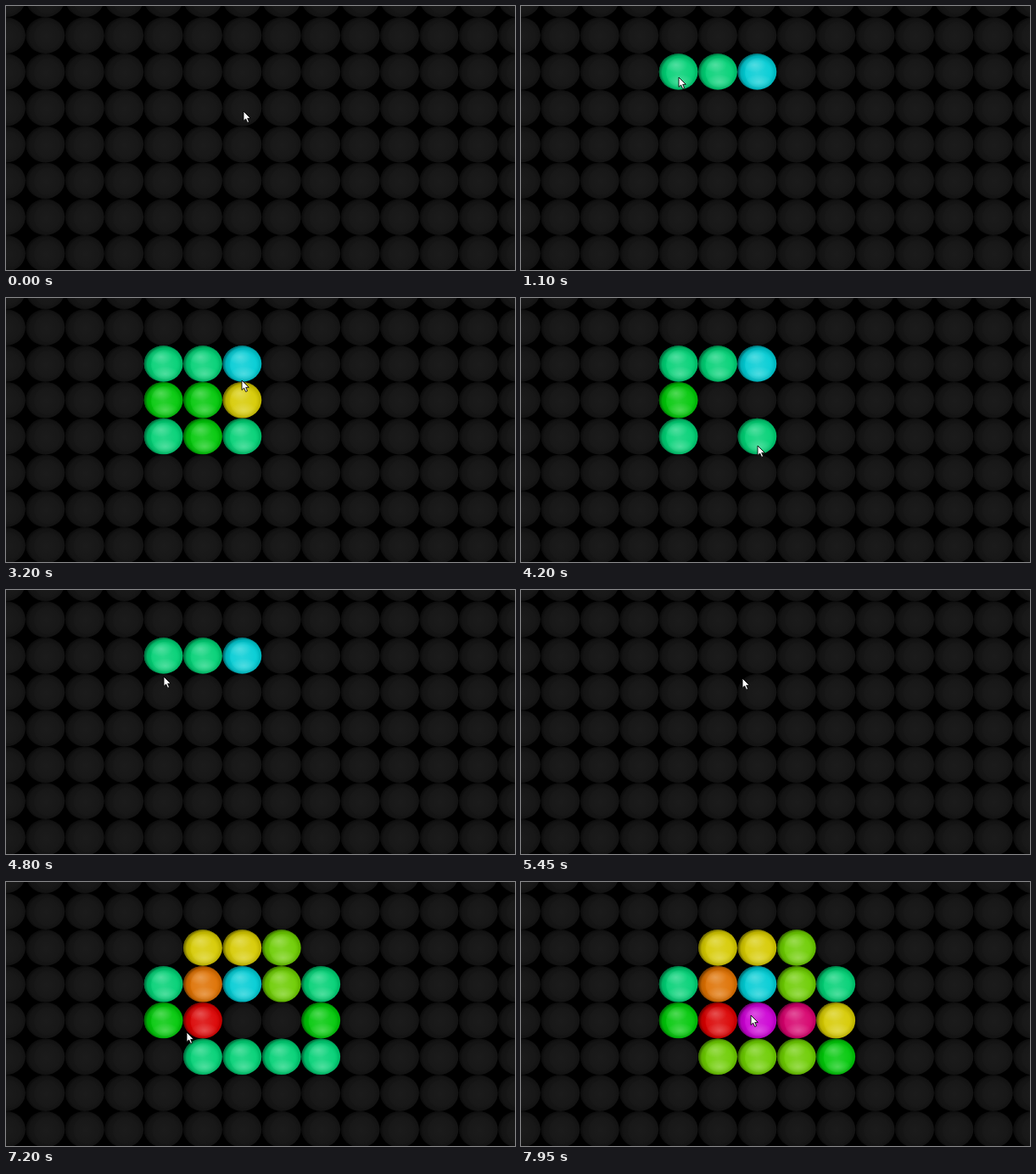
These frames come from a looping animation (600 px wide and 311 px high, 8 s). An HTML page:

```html
<!DOCTYPE html>
<html lang="en">
<head>
<meta charset="utf-8">
<title>Colour balls</title>
<style>
  html, body { margin: 0; width: 100%; height: 100%; overflow: hidden; background: #000; }
  svg { display: block; width: 100vw; height: 100vh; }
</style>
</head>
<body>
<svg viewBox="0 0 600 311" preserveAspectRatio="none">
  <defs>
    <radialGradient id="rim" cx=".54" cy=".52" r=".52">
      <stop offset=".6" stop-color="#000" stop-opacity="0"/>
      <stop offset=".88" stop-color="#000" stop-opacity=".13"/>
      <stop offset="1" stop-color="#000" stop-opacity=".45"/>
    </radialGradient>
    <radialGradient id="lens" cx=".42" cy=".5" r=".6">
      <stop offset="0" stop-color="#fff" stop-opacity=".16"/>
      <stop offset="1" stop-color="#fff" stop-opacity=".02"/>
    </radialGradient>
    <radialGradient id="glow">
      <stop offset="0" stop-color="#fff" stop-opacity=".24"/>
      <stop offset="1" stop-color="#fff" stop-opacity="0"/>
    </radialGradient>
    <g id="ball">
      <ellipse rx="22.9" ry="21.3" fill="currentColor"/>
      <ellipse rx="22.9" ry="21.3" fill="url(#rim)"/>
    </g>
    <g id="off" color="#161616">
      <use href="#ball"/>
      <ellipse cx="3.5" cy="1" rx="16.5" ry="17" fill="url(#lens)" opacity=".14"/>
    </g>
    <g id="lit">
      <use href="#ball"/>
      <ellipse cx="2.5" cy="1" rx="17" ry="17.5" fill="url(#lens)"/>
      <ellipse cx="-3" cy="-8" rx="14" ry="9" fill="url(#glow)"/>
      <ellipse cx="2" cy="12" rx="16" ry="9" fill="url(#glow)"/>
    </g>
  </defs>
  <rect width="600" height="311"/>
  <g id="grid"></g>
  <path id="cursor" d="M0 0V11.4L2.6 9L4.6 13.4L6.6 12.5L4.7 8.3H8.3Z"
        fill="#fff" stroke="#000" stroke-width=".9"/>
</svg>
<script>
const LOOP = 8000, TICK = 50, COLS = 14, ROWS = 8;
const COLORS = {
  c: '#00ccd4', t: '#00d074', g: '#00c808', l: '#6ccc00', y: '#d6ca00',
  o: '#de7000', r: '#da0000', p: '#d6006c', m: '#cc00d4'
};
const STEPS = { L: [-1, 0], R: [1, 0], U: [0, -1], D: [0, 1] };
const centerX = col => col * 46.4;
const centerY = row => row * 42.8 - 8.2;

const path = [];
const changes = [];

function move(time, x, y) {
  path.push({ time, x, y });
}

// Walk from ball to ball; each visit sets the next colour, or clears without one.
function stroke(time, interval, col, row, steps, colors = '') {
  for (let i = 0; i <= steps.length; i++) {
    if (i) {
      const [dx, dy] = STEPS[steps[i - 1]];
      col += dx;
      row += dy;
      time += interval;
    }
    move(time, centerX(col), centerY(row));
    changes.push({ time, ball: row * COLS + col, color: COLORS[colors[i]] });
  }
}

move(0, 280, 124);
stroke(725, 175, 6, 2, 'LLDDRRU', 'cttgtgty');
move(2000, 267, 133);
stroke(2250, 0, 5, 3, '', 'g');
move(2550, 246, 138);
move(2850, 280, 111);
move(3000, 280, 110);
move(3250, 277, 94);
stroke(3400, 350, 6, 3, 'LD');
move(4200, 279, 174);
stroke(4250, 0, 6, 4, '');
stroke(4550, 175, 4, 4, 'UURR');
move(5450, 261, 104);
move(5600, 299, 132);
stroke(5900, 120, 6, 3, 'LLD', 'cttg');
move(6350, 240, 217);
stroke(6420, 66, 5, 5, 'RRRUULULLDD', 'ttttgtllyyor');
move(7200, 213, 177);
stroke(7300, 93, 5, 5, 'RRRULL', 'lllgypm');
move(7950, 271, 157);
move(LOOP, 271, 157);

const grid = document.getElementById('grid');
const cursor = document.getElementById('cursor');
const balls = Array.from({ length: COLS * ROWS }, (_, i) => {
  const ball = document.createElementNS('http://www.w3.org/2000/svg', 'use');
  const x = centerX(i % COLS), y = centerY(Math.floor(i / COLS));
  ball.setAttribute('transform', `translate(${x} ${y})`);
  return grid.appendChild(ball);
});

function pointerAt(t) {
  const next = path.findIndex(p => p.time > t);
  const a = path[next - 1], b = path[next];
  const k = (t - a.time) / (b.time - a.time);
  return [a.x + (b.x - a.x) * k, a.y + (b.y - a.y) * k];
}

function render(t) {
  const state = {};
  for (const { time, ball, color } of changes) {
    if (time <= t) state[ball] = color;
  }
  balls.forEach((ball, i) => {
    ball.setAttribute('href', state[i] ? '#lit' : '#off');
    ball.setAttribute('color', state[i] || '#000');
  });
  const [x, y] = pointerAt(t).map(Math.round);
  cursor.setAttribute('transform', `translate(${x} ${y})`);
}

const start = performance.now();
let shown = -1;
function frame() {
  const elapsed = Math.max(0, performance.now() - start) % LOOP;
  const t = Math.floor(elapsed / TICK) * TICK;
  if (t !== shown) render(shown = t);
  requestAnimationFrame(frame);
}
frame();
</script>
</body>
</html>
```
